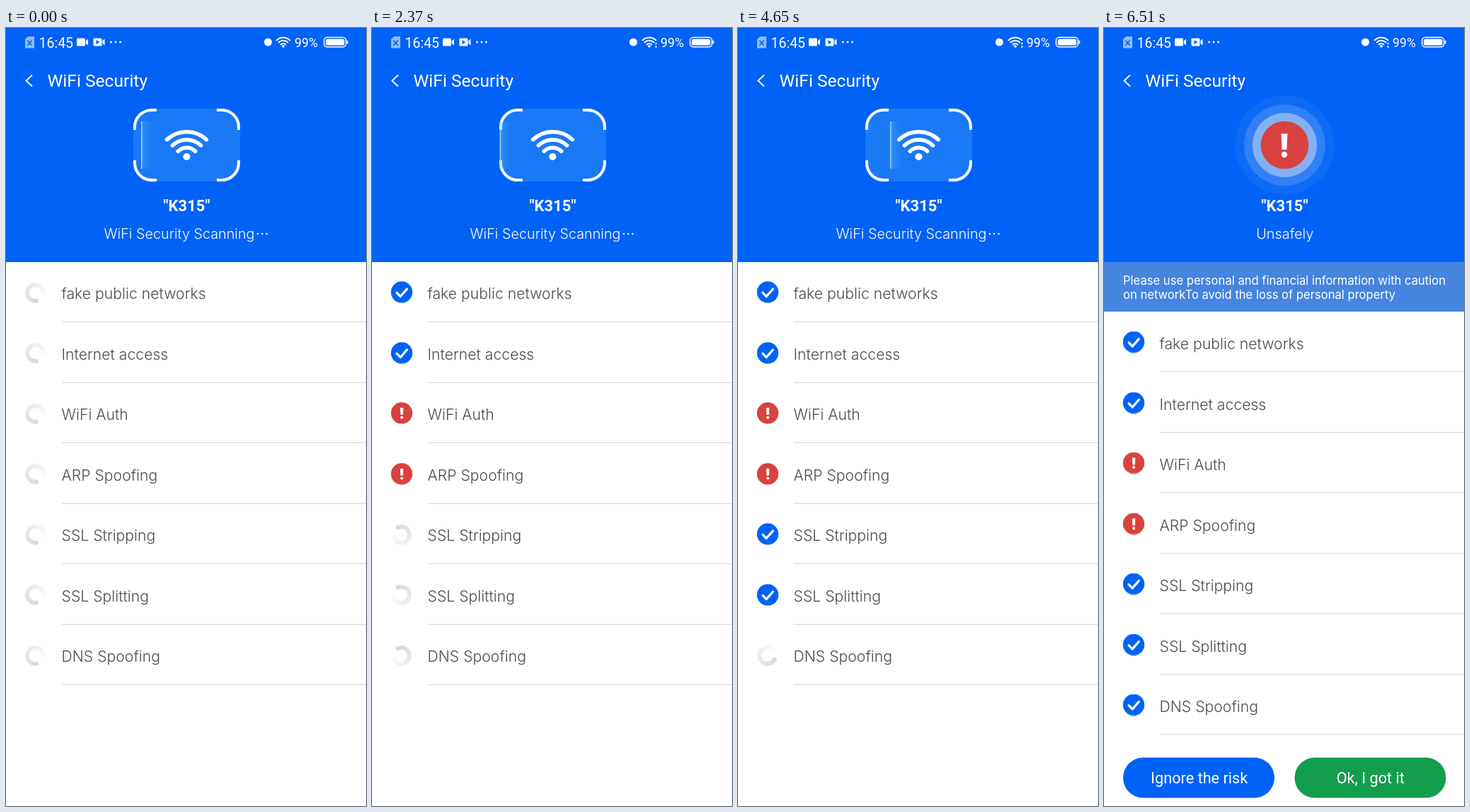
Recreate the animation shown at these times as an HTML page. Size 509 by 1100 pixels, loop 6540 ms.

```html
<!DOCTYPE html>
<html lang="en">
<head>
<meta charset="utf-8">
<title>WiFi Security</title>
<style>
  :root { --loop: 6540ms; --blue: #0062f6; --red: #d9423e; }
  html, body { margin: 0; width: 100%; height: 100%; overflow: hidden; background: #fff; }
  .stage { position: relative; width: 509px; height: 1100px; overflow: hidden; background: #fff; }
  svg { position: absolute; left: 0; top: 0; overflow: visible; }
  .ui { font-family: Roboto, sans-serif; fill: #fff; }
  .light { font-family: Inter, Roboto, sans-serif; font-weight: 300; }
  .note { font-family: Inter, Roboto, sans-serif; font-size: 16.6px; }
  .line { fill: none; stroke: #fff; }

  /* scene change from scanning to result */
  .scanning { animation: leave var(--loop) step-end infinite; }
  .result { opacity: 0; animation: enter var(--loop) step-end infinite; }
  .list { position: absolute; left: 0; top: 331px; animation: drop var(--loop) step-end infinite; }
  @keyframes leave { 0% { opacity: 1 } 75% { opacity: 0 } }
  @keyframes enter { 0% { opacity: 0 } 75% { opacity: 1 } }
  @keyframes drop { 0% { transform: none } 75% { transform: translateY(70.5px) } }

  .active { animation: active var(--loop) step-end infinite; }
  .badge { animation: nudge var(--loop) step-end infinite; }
  @keyframes active { 0% { opacity: 0 } 30.7% { opacity: 1 } }
  @keyframes nudge { 0% { transform: none } 30.7% { transform: translateX(-1px) } }

  /* the beam swings like a sine; the first stretch starts mid-swing */
  .beam { animation: sweep var(--loop) cubic-bezier(.364, 0, .636, 1) infinite; }
  @keyframes sweep {
    0% { transform: translateX(11px); animation-timing-function: cubic-bezier(.33, .26, .66, 1) }
    16.68% { transform: translateX(132px) }
    37.19% { transform: translateX(0) }
    57.69% { transform: translateX(132px) }
    78.2%, 100% { transform: translateX(0) }
  }

  .ripple { transform-origin: 255.5px 165.5px; animation: rippleA var(--loop) linear infinite; }
  .ripple.second { animation-name: rippleB; }
  @keyframes rippleA {
    0%, 75% { transform: scale(1); opacity: .26 }
    91.46% { transform: scale(1.567); opacity: .05 }
    91.47% { transform: scale(1); opacity: .26 }
    100% { transform: scale(1.293); opacity: .15 }
  }
  @keyframes rippleB {
    0%, 83.2% { transform: scale(1); opacity: 0 }
    83.21% { transform: scale(1); opacity: .26 }
    99.7%, 100% { transform: scale(1.567); opacity: .05 }
  }

  .row { position: absolute; left: 0; width: 509px; height: 85.5px; }
  .spinner {
    position: absolute; left: 27px; top: 28.5px; width: 29px; height: 29px; border-radius: 50%;
    background: conic-gradient(from 90deg, #d9dada, #e3e4e4 95deg, #f2f2f2 220deg, #fff 310deg);
    -webkit-mask: radial-gradient(circle, transparent 8px, #000 8.8px);
    mask: radial-gradient(circle, transparent 8px, #000 8.8px);
    animation: spin var(--loop) linear infinite;
  }
  .spinner::after {
    content: ""; position: absolute; right: 0; top: 11.5px;
    width: 6px; height: 6px; border-radius: 50%; background: #d9dada;
  }
  @keyframes spin { from { transform: rotate(80deg) } to { transform: rotate(1518.8deg) } }
</style>
</head>
<body>
<div class="stage">
  <svg width="509" height="1100" viewBox="0 0 509 1100">
    <defs>
      <linearGradient id="glow">
        <stop offset="0" stop-color="#6cbcf0" stop-opacity=".32"/>
        <stop offset="1" stop-color="#4aa0f4" stop-opacity="0"/>
      </linearGradient>
    </defs>
    <rect width="509" height="331" fill="var(--blue)"/>

    <!-- status bar -->
    <g class="ui">
      <path d="M31 12h9v16.500h-13v-12.500z" fill="#8fbaff"/>
      <path d="M30.500 17.500l6 7m0-7l-6 7" class="line" style="stroke:var(--blue)" stroke-width="1.700"/>
      <text x="46.500" y="27.700" font-size="19.500">16:45</text>
      <rect x="100" y="14.500" width="12" height="11" rx="1.500"/>
      <path d="M113 18l3-2.500v9l-3-2.500z"/>
      <rect x="123.500" y="14.500" width="12" height="11" rx="1.500"/>
      <path d="M136.500 18l3-2.500v9l-3-2.500z"/>
      <path d="M127.500 17l5 3-5 3z" fill="var(--blue)"/>
      <circle cx="148.500" cy="20" r="1.400"/><circle cx="155" cy="20" r="1.400"/><circle cx="161.500" cy="20" r="1.400"/>
      <circle class="badge" cx="370.500" cy="20" r="5.500"/>
      <g id="statusWifi"></g>
      <g class="active"><circle cx="401.500" cy="22" r="1.200"/><circle cx="401.500" cy="26.500" r="1.200"/></g>
      <text x="408" y="26.700" font-size="17.700">99%</text>
      <rect x="449.700" y="13.200" width="31" height="13.600" rx="4.500" class="line" stroke-width="1.500"/>
      <rect x="452" y="15.500" width="26.500" height="9" rx="2.500"/>
      <rect x="481.700" y="17.500" width="1.800" height="5" rx=".9"/>
    </g>

    <!-- title -->
    <path d="M37 66.500l-8.500 8 8.500 8" class="line" stroke-width="1.900"/>
    <g class="ui">
      <text x="58.500" y="83.300" font-size="24.600">WiFi Security</text>
      <text x="255.500" y="258.700" font-size="22" font-weight="700" text-anchor="middle">"K315"</text>
    </g>

    <g class="scanning" fill="#fff">
      <rect x="180" y="114" width="151" height="103" rx="26" fill="#1a79f7"/>
      <path class="line" stroke-width="4" d="M182 144v-4a24 24 0 0 1 24-24h7 M298 116h7a24 24 0 0 1 24 24v4
        M329 187v4a24 24 0 0 1-24 24h-7 M213 215h-7a24 24 0 0 1-24-24v-4"/>
      <g id="mainWifi"></g>
      <g class="beam">
        <rect x="180" y="132" width="19" height="67" fill="url(#glow)"/>
        <rect x="180" y="132" width="1.400" height="67" fill="#a9e2e4"/>
      </g>
      <text class="light" x="138.500" y="298" font-size="19.800">WiFi Security Scanning</text>
      <circle cx="356" cy="291" r="1.200"/><circle cx="362.300" cy="291" r="1.200"/><circle cx="368.600" cy="291" r="1.200"/>
    </g>

    <g class="result" fill="#fff">
      <circle class="ripple" cx="255.500" cy="165.500" r="45"/>
      <circle class="ripple second" cx="255.500" cy="165.500" r="45"/>
      <circle cx="255.500" cy="165.500" r="45.500" fill="#84b1f3"/>
      <circle cx="255.500" cy="165.500" r="33.800" fill="var(--red)"/>
      <path d="M250.500 149.500h9l-1.200 22.500h-6.600z"/>
      <circle cx="255" cy="179" r="4.300"/>
      <text class="light" x="255.800" y="298" font-size="19.900" text-anchor="middle">Unsafely</text>
      <rect y="331" width="509" height="70" fill="#4585e0"/>
      <g class="note">
        <text x="27" y="363">Please use personal and financial information with caution</text>
        <text x="27" y="383">on networkTo avoid the loss of personal property</text>
      </g>
      <rect x="27" y="1031.500" width="214" height="57" rx="28.500" fill="var(--blue)"/>
      <rect x="269.500" y="1031.500" width="214" height="57" rx="28.500" fill="#139e4d"/>
      <g class="ui" font-size="21.700" text-anchor="middle">
        <text x="134.700" y="1068">Ignore the risk</text>
        <text x="376.800" y="1068">Ok, I got it</text>
      </g>
    </g>
  </svg>
  <div class="list" id="list"></div>
</div>

<script>
  const LOOP = 6540;
  const rows = [
    ['fake public networks', 500, true],
    ['Internet access', 1150, true],
    ['WiFi Auth', 1700, false],
    ['ARP Spoofing', 2260, false],
    ['SSL Stripping', 3050, true],
    ['SSL Splitting', 4050, true],
    ['DNS Spoofing', 4790, true]
  ];
  const byId = id => document.getElementById(id);

  // Concentric arcs over a dot
  function wifi(id, x, y, radii, width, dotY, dotR) {
    const arcs = radii.map(r => {
      const dx = r * 0.69, dy = r * 0.724;
      return `M${x - dx} ${y - dy}A${r} ${r} 0 0 1 ${x + dx} ${y - dy}`;
    }).join('');
    byId(id).innerHTML =
      `<path class="line" stroke-width="${width}" stroke-linecap="round" d="${arcs}"/>
       <circle cx="${x}" cy="${dotY}" r="${dotR}"/>`;
  }
  wifi('mainWifi', 255.5, 187, [40.3, 29, 17.7], 5.6, 182, 5);
  wifi('statusWifi', 392, 27, [13.5, 9.2, 5], 2, 25.7, 1.9);

  const check = `<circle cx="42" cy="42.400" r="15.200" fill="var(--blue)"/>
    <path class="line" stroke-width="3.300" stroke-linecap="round" stroke-linejoin="round" d="M35 43.300l5.200 5.200 9.200-10.500"/>`;
  const alarm = `<circle cx="42" cy="42.400" r="15.200" fill="var(--red)"/>
    <path fill="#fff" d="M39.800 35h4.600l-.7 10h-3.200z"/><circle cx="42.100" cy="48.800" r="2" fill="#fff"/>`;

  function switchAt(el, time, before, after) {
    el.animate([
      { opacity: before, offset: 0, easing: 'step-end' },
      { opacity: after, offset: time / LOOP, easing: 'step-end' },
      { opacity: after, offset: 1 }
    ], { duration: LOOP, iterations: Infinity });
  }

  rows.forEach(([label, time, safe], i) => {
    const row = document.createElement('div');
    row.className = 'row';
    row.style.top = i * 85.5 + 'px';
    row.innerHTML = `<div class="wait"><div class="spinner"></div></div>
      <svg width="509" height="85.500">
        <text class="light" x="78.500" y="52" font-size="21.200" fill="#4c4c4c">${label}</text>
        <rect x="79" y="83.700" width="430" height="1.300" fill="#dedede"/>
        <g class="done">${safe ? check : alarm}</g>
      </svg>`;
    byId('list').append(row);
    switchAt(row.querySelector('.wait'), time, 1, 0);
    switchAt(row.querySelector('.done'), time, 0, 1);
  });
</script>
</body>
</html>
```
